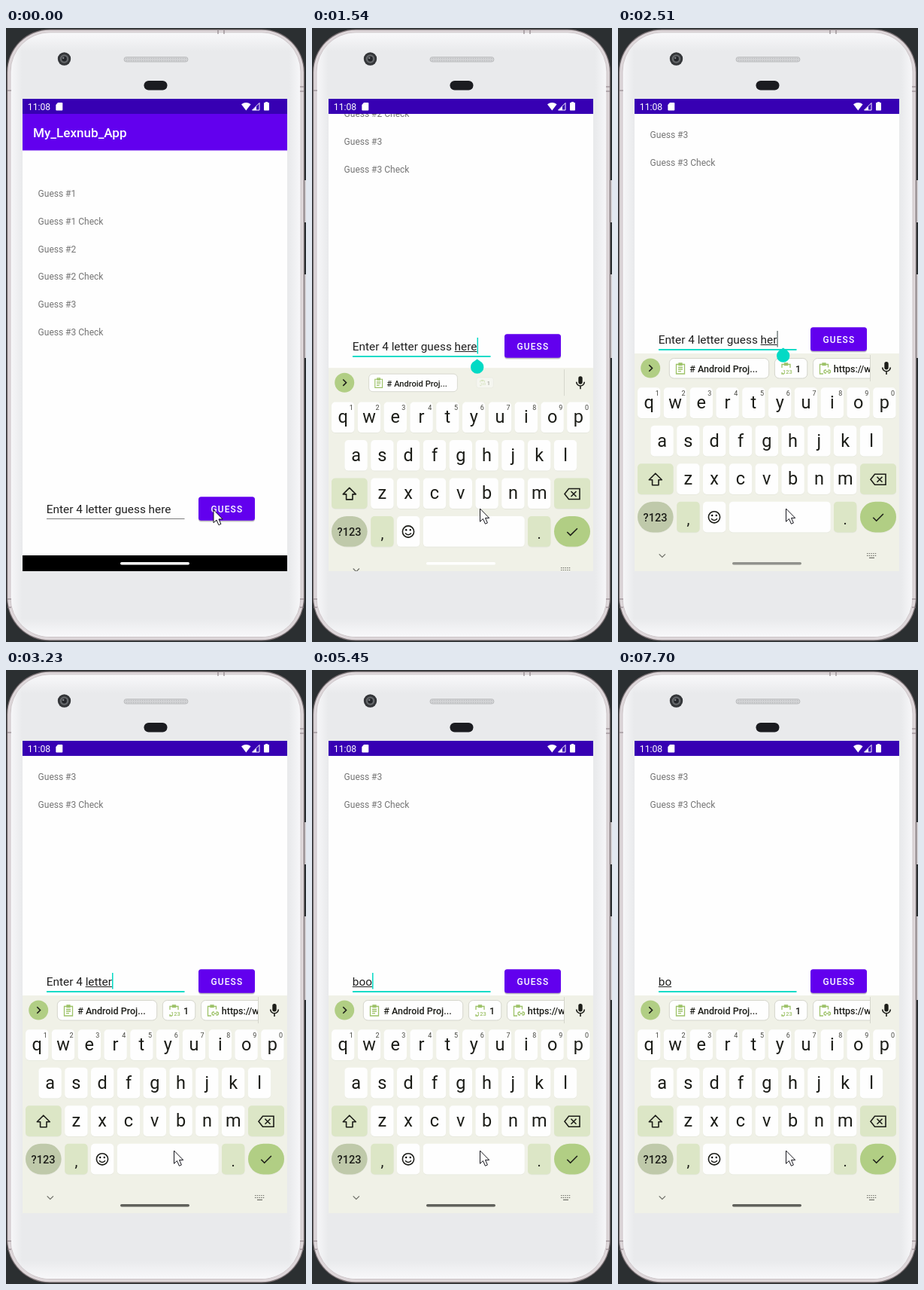
Animation, 399 px wide and 815 px high, one loop 8000 ms. Source, as an HTML page:

```html
<!DOCTYPE html>
<html lang="en">
<head>
<meta charset="utf-8">
<title>Word guessing app</title>
<style>
html, body { margin: 0; width: 100%; height: 100%; overflow: hidden; background: #2b2f31; }
svg { display: block; width: 399px; height: 815px; font-family: Roboto, "Noto Sans", sans-serif; }
text { white-space: pre; }
.medium { font-weight: 500; }
.mid { text-anchor: middle; }
.line { fill: none; stroke: #1c1d18; stroke-width: 1.6; }
.thin { fill: none; stroke: #6d6e67; stroke-width: 1.2; }
.green { fill: none; stroke: #9dc268; stroke-width: 1.3; }
</style>
</head>
<body>
<svg viewBox="0 0 399 815">
  <defs>
    <linearGradient id="side">
      <stop offset="0" stop-color="#f7f7f9"/><stop offset=".04" stop-color="#e9eaec"/>
      <stop offset=".96" stop-color="#e9eaec"/><stop offset="1" stop-color="#f7f7f9"/>
    </linearGradient>
    <linearGradient id="ends" x2="0" y2="1">
      <stop offset="0" stop-color="#f8f8fa"/><stop offset=".03" stop-color="#f8f8fa" stop-opacity="0"/>
      <stop offset=".97" stop-color="#f8f8fa" stop-opacity="0"/><stop offset="1" stop-color="#f8f8fa"/>
    </linearGradient>
    <pattern id="mesh" width="3" height="3" patternUnits="userSpaceOnUse">
      <rect width="3" height="3" fill="#d2d3d5"/><circle cx="1.5" cy="1.5" r=".7" fill="#b9babd"/>
    </pattern>
    <clipPath id="screen"><rect x="22" y="94" width="352" height="627"/></clipPath>
    <clipPath id="strip"><rect x="60" y="432" width="275" height="40"/></clipPath>
  </defs>

  <!-- phone -->
  <rect width="399" height="815" fill="#2b2f31"/>
  <g fill="#c9c5c8">
    <rect x="394" y="202" width="5" height="56"/>
    <rect x="394" y="327" width="5" height="111"/>
  </g>
  <rect x="1" y="1.5" width="396" height="812" rx="57" fill="#766d70"/>
  <rect x="2.2" y="2.7" width="393.6" height="809.6" rx="56" fill="#ddd6d9"/>
  <rect x="6" y="6" width="386" height="802.5" rx="52" fill="url(#side)" stroke="#cdc5c8"/>
  <rect x="6.5" y="6.5" width="385" height="801.5" rx="51.5" fill="url(#ends)"/>
  <path d="M282 3v5M290 3v5M391 78h5M391 84h5M2 83h5M2 758h5M2 769h5M391 758h5M391 769h5" stroke="#877d81" stroke-width="1.1"/>
  <circle cx="77.5" cy="41" r="8.7" fill="#343639"/>
  <circle cx="77.5" cy="41" r="5.8" fill="#65686b"/>
  <circle cx="77.5" cy="41" r="3.4" fill="#24262a"/>
  <circle cx="76.2" cy="39.8" r="1.2" fill="#85888c"/>
  <rect x="157" y="38.5" width="85" height="6.5" rx="3.2" fill="url(#mesh)" stroke="#b9babc" stroke-width=".8"/>
  <rect x="183.5" y="70" width="31" height="12.5" rx="6.2" fill="#1b1c20"/>

  <g clip-path="url(#screen)">
    <rect x="22" y="94" width="352" height="627" fill="#fefefe"/>
    <g id="content">
      <rect x="22" y="114" width="352" height="48.5" fill="#6200ee"/>
      <text class="medium" x="36" y="145" font-size="17.1" fill="#fff">My_Lexnub_App</text>
      <g id="guesses" font-size="12" fill="#757575"></g>
      <rect id="field" x="54" y="651" width="183.5"/>
      <text id="entry" x="53.8" y="644" font-size="15.36" fill="#202020"></text>
      <rect id="underline" y="645" height="1" fill="#202020"/>
      <rect id="caret" y="627" height="21.5"/>
      <rect x="256" y="624" width="75" height="32" rx="4" fill="#000" opacity=".1"/>
      <rect x="256" y="623" width="75" height="32" rx="3.5" fill="#000" opacity=".16"/>
      <rect x="256" y="622.3" width="75" height="31.5" rx="3.5" fill="#6200ee"/>
      <text class="medium" x="272.6" y="642.6" font-size="12" letter-spacing="1.07" fill="#fff">GUESS</text>
    </g>

    <rect x="22" y="94" width="352" height="20" fill="#3700b3"/>
    <g fill="#fff">
      <text x="28.8" y="108.8" font-size="12.2">11:08</text>
      <path d="M69 99h5.3q1 0 1 1v8.6q0 1-1 1h-7q-1 0-1-1V102z"/>
      <path d="M313 101.2q6.3-4.6 12.6 0L319.3 109.5z"/>
      <path d="M337 99.5v9.5h-9.5z" fill="none" stroke="#fff"/>
      <path d="M333 104v5h-5z"/>
      <path d="M345 99v-1h3v1h1.2q.8 0 .8.8v9q0 .8-.8.8h-5.4q-.8 0-.8-.8v-9q0-.8.8-.8z"/>
    </g>

    <rect id="navbar" x="22" y="700" width="352" height="21"/>
    <g id="keyboard">
      <rect x="22" y="432" width="352" height="300" fill="#f0f1e7"/>
      <circle cx="43.2" cy="451.5" r="13" fill="#b1ce84"/>
      <path class="line" d="M41.3 447.3l4.2 4.2-4.2 4.2"/>
      <g clip-path="url(#strip)">
        <g class="chip" data-cx="134.5">
          <rect x="68.3" y="438.5" width="132.4" height="26.5" rx="6" fill="#fefefe" stroke="#d5d6cc"/>
          <path class="green" d="M77.5 446.5h11v12.5h-11zM81 445h4v2.5h-4zM80 450.5h6M80 453h6M80 455.6h4"/>
          <text class="medium" x="95.3" y="457" font-size="12.5" fill="#1c1d18"># Android Proj...</text>
        </g>
        <g class="chip" data-cx="230">
          <rect x="208.4" y="438.5" width="43.4" height="26.5" rx="6" fill="#fefefe" stroke="#d5d6cc"/>
          <path class="green" d="M218 451v-4.5h11v4.5M221.5 445h4v2.5h-4zM218 457v2h3"/>
          <text class="medium" x="219" y="458.8" font-size="7.5" fill="#9dc268">123</text>
          <text class="medium" x="236" y="457" font-size="12.5" fill="#1c1d18">1</text>
        </g>
        <g class="chip" data-cx="318">
          <rect x="259.5" y="438.5" width="117" height="26.5" rx="6" fill="#fefefe" stroke="#d5d6cc"/>
          <path class="green" d="M273 459h-4.5v-12.5h11v4M272 445h4v2.5h-4zM277 454h-1a2 2 0 0 0 0 4h1M279.5 454h1a2 2 0 0 1 0 4h-1M276.5 456h4"/>
          <text class="medium" x="286.8" y="457" font-size="12.5" fill="#1c1d18">https://www</text>
        </g>
      </g>
      <path d="M335.5 434v35" stroke="#d5d6cc"/>
      <rect x="354.3" y="443" width="5.4" height="10.5" rx="2.7" fill="#1c1d18"/>
      <path class="line" d="M351.7 450.5a5.3 5.3 0 0 0 10.6 0M357 456v4"/>
      <g id="keys"></g>
      <path class="line" d="M49.8 591.2l8.5 8.5h-4.3v7h-8.4v-7h-4.3z" stroke-linejoin="round"/>
      <path class="line" d="M341.5 592.3h14.5v14h-14.5l-5.5-7zM344.5 595.8l7 7M351.5 595.8l-7 7"/>
      <circle class="line" cx="128" cy="649.3" r="7.6"/>
      <path class="line" d="M124 651.3q4 4.4 8 0"/>
      <circle cx="125.2" cy="647" r="1.2"/><circle cx="130.8" cy="647" r="1.2"/>
      <path class="line" d="M339.3 649.8l4.4 4.4 9.2-9.2"/>
      <path class="thin" d="M54.7 698.3l4.1 4.1 4.1-4.1"/>
      <path class="thin" d="M331 697.5h13M331 700.3h13" stroke-dasharray="1.4 1.3"/>
      <path class="thin" d="M334 703.3h7"/>
    </g>
    <path id="handle" d="M219.7 649.5 L226 654 A8.7 8.7 0 1 1 213.4 654 Z" fill="#03dac5"/>
    <rect id="pill" x="152" y="709" width="92" height="3.4" rx="1.7"/>
  </g>
  <path id="pointer" d="M0 0V17.2L4 13.5L6.9 20.2L9.9 18.9L7 12.4H12.2Z" fill="#fff" stroke="#15151c" stroke-width="1"/>
</svg>
<script>
const $ = id => document.getElementById(id);
const set = (el, attrs) => { for (const k in attrs) el.setAttribute(k, attrs[k]); };
const show = (el, on) => { el.style.display = on ? "" : "none"; };
const slide = (el, y) => set(el, { transform: `translate(0 ${y})` });

function add(parent, tag, attrs, text) {
  const el = document.createElementNS("http://www.w3.org/2000/svg", tag);
  set(el, attrs);
  if (text) el.textContent = text;
  parent.append(el);
}

for (let i = 0; i < 6; i++) {
  const label = `Guess #${(i >> 1) + 1}` + (i % 2 ? " Check" : "");
  add($("guesses"), "text", { x: 42.6, y: 223.7 + i * 36.9 }, label);
}

const keys = $("keys");
const PALE = "#dce6c6";
const key = (x, y, w, fill, rx = 5) => {
  add(keys, "rect", { x, y: y + .8, width: w, height: 40.6, rx, fill: "#dcddd3", opacity: .5 });
  add(keys, "rect", { x, y, width: w, height: 40.6, rx, fill });
};
const glyph = (x, y, s, size, attrs) =>
  add(keys, "text", { x, y, class: "mid", "font-size": size, fill: "#1c1d18", ...attrs }, s);

[["qwertyuiop", 26], ["asdfghjkl", 43.4], ["zxcvbnm", 78.2]].forEach(([letters, left], row) => {
  const y = 477.3 + row * 50.5;
  [...letters].forEach((ch, i) => {
    const x = left + i * 34.8;
    key(x, y, 30.4, "#fefefe");
    glyph(x + 15.2, y + 28, ch, 23.5);
    if (row === 0) glyph(x + 26.3, y + 10.7, String((i + 1) % 10), 9, { fill: "#45463f" });
  });
});
key(26, 578.3, 47.6, PALE);
key(322, 578.3, 48, PALE);
key(26, 628.8, 47.6, "#bfc9aa", 20.3);
key(78.2, 628.8, 30.4, PALE);
key(113, 628.8, 30.4, "#fefefe");
key(147.8, 628.8, 135, "#fefefe");
key(287, 628.8, 30.4, PALE);
key(322, 628.8, 48, "#b1ce84", 20.3);
glyph(49.6, 655, "?123", 14.6, { class: "mid medium" });
glyph(93.4, 659, ",", 20);
glyph(302.2, 659, ".", 20);

const measure = document.createElement("canvas").getContext("2d");
measure.font = "15.36px Roboto, 'Noto Sans', sans-serif";
const widthOf = s => measure.measureText(s).width;

// Latest value at time t in a list of [start, value] pairs.
const at = (list, t) => list.reduce((value, [start, next]) => t >= start ? next : value, list[0][1]);

const PROMPT = "Enter 4 letter guess here";
const typed = [
  [0, PROMPT], [2510, PROMPT.slice(0, -1)], [2660, PROMPT.slice(0, -2)],
  [2930, "Enter 4 letter guess"], [3080, "Enter 4 letter gu"], [3200, "Enter 4 letter"],
  [3350, "Enter 4 l"], [3500, "Enter"], [3650, ""],
  [4590, "b"], [4990, "bo"], [5140, "boo"], [6920, "bo"]
];
const caretOn = [
  [0, false], [1150, true], [2220, false], [2510, true], [4190, false],
  [4590, true], [5910, false], [6370, true], [7700, false]
];
const pointerX = [[0, 276], [120, 272], [270, 256], [420, 238], [570, 227], [720, 223.5]];
const pan = [[0, 0], [1540, 216], [1660, 223.5], [1810, 225]];
const handlePan = [[0, 0], [1540, 210], [1660, 222], [1810, 225]];
const drop = [[0, 320], [1540, 19.2], [1660, 4], [1810, 0]];
const chipScales = [[0, [.89, .52, 0]], [1660, [.96, .85, .6]], [1810, [.99, .97, .92]], [1950, [1, 1, 1]]];
const pillFill = [[0, "#fff"], [2220, "#c4c5be"], [2510, "#91928c"], [2660, "#7b7c76"], [2930, "#666761"], [3080, "#60615c"]];

function draw(t) {
  const focused = t >= 1150;
  const text = at(typed, t);
  const wordStart = text.lastIndexOf(" ") + 1;
  const marked = t >= 5140 && t < 5450 ? "bo" : text.slice(wordStart);

  slide($("content"), -at(pan, t));
  $("entry").textContent = text;
  set($("field"), focused ? { height: 1.9, fill: "#03dac5" } : { height: 1, fill: "#7d7d7d" });
  set($("underline"), { x: 53.8 + widthOf(text.slice(0, wordStart)), width: widthOf(marked) });
  show($("underline"), t >= 1270 && marked);
  const fresh = t >= 2510 && t < 2660;
  set($("caret"), {
    x: 53.9 + widthOf(text), width: fresh ? 1 : 1.5, fill: fresh ? "#30403f" : "#03dac5"
  });
  show($("caret"), at(caretOn, t));
  slide($("handle"), -at(handlePan, t));
  show($("handle"), t >= 1270 && t < 2660);

  slide($("keyboard"), at(drop, t));
  show($("keyboard"), t >= 1540);
  set($("navbar"), { fill: t < 1540 ? "#000" : "#f0f1e7" });
  set($("pill"), { fill: at(pillFill, t) });
  const scales = at(chipScales, t);
  document.querySelectorAll(".chip").forEach((chip, i) => {
    const s = scales[i], cx = chip.dataset.cx;
    set(chip, {
      transform: `translate(${cx} 451.5) scale(${s}) translate(${-cx} -451.5)`,
      opacity: Math.max(0, Math.min(1, (s - .3) * 1.8))
    });
  });

  const px = at(pointerX, t);
  set($("pointer"), { transform: `translate(${px} ${638 + (px - 223.5) / 35})` });
}

const begin = performance.now();
function tick() {
  draw((performance.now() - begin) % 8000);
  requestAnimationFrame(tick);
}
tick();
</script>
</body>
</html>
```
